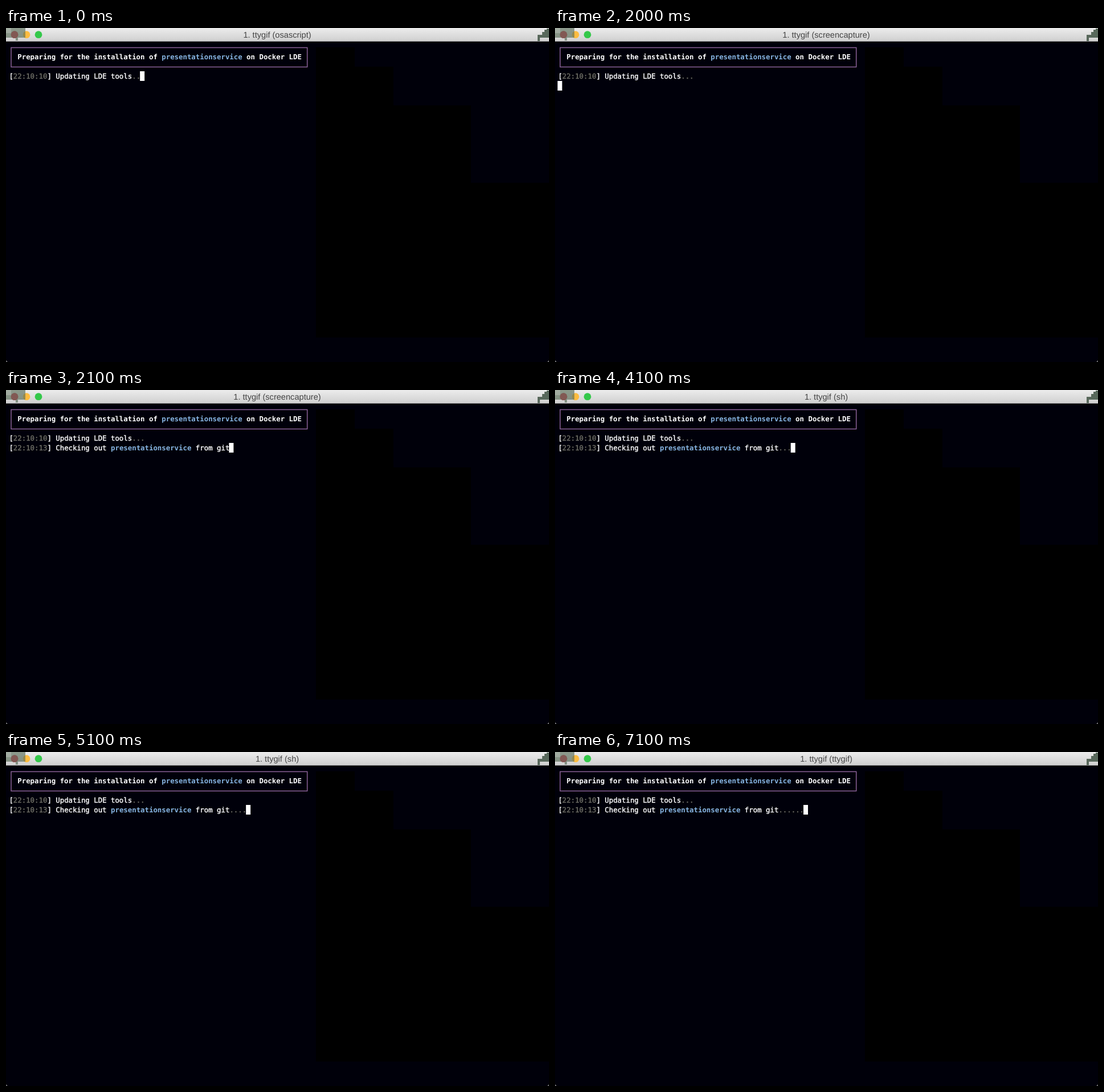
These frames come from a looping animation (953x587 px, 8 s). An HTML page with a canvas:

```html
<!DOCTYPE html>
<html lang="en">
<head>
<meta charset="utf-8">
<title>Terminal</title>
<style>
html, body { margin: 0; width: 100%; height: 100%; overflow: hidden; background: #00000a; }
canvas { position: absolute; left: 0; top: 0; }
#title {
  position: absolute; left: 0; top: 1px; width: 952px; height: 24px;
  font: 14.6px/24px "Liberation Sans", Arial, sans-serif;
  text-align: center; color: #444; text-rendering: geometricPrecision;
}
.row {
  position: absolute; left: 5.4px; height: 17px; white-space: pre; color: #fff;
  font: 12.36px/17px "DejaVu Sans Mono", Menlo, monospace;
  text-rendering: geometricPrecision; -webkit-text-stroke: .4px;
}
.row b { -webkit-text-stroke: 0; }
.name { color: #87b5e2; }
.dim { color: #6c6c63; }
#cursor { position: absolute; left: 0; top: 0; width: 7.6px; height: 17px; background: #fff; }
</style>
</head>
<body>
<canvas id="stage" width="953" height="587"></canvas>
<div id="title"></div>
<div class="row" style="top:43px"><b>  Preparing for the installation of <span class="name">presentationservice</span> on Docker LDE</b></div>
<div class="row" id="update" style="top:77px">[<span class="dim">22:10:10</span>] Updating LDE tools<span class="dim dots"></span></div>
<div class="row" id="checkout" style="top:94px">[<span class="dim">22:10:13</span>] Checking out <b class="name">presentationservice</b> from git<span class="dim dots"></span></div>
<div id="cursor"></div>
<script>
const LOOP = 8000, CELL = 7.44, LEFT = 4.5;
const $ = id => document.getElementById(id);
const ctx = $('stage').getContext('2d');

// start time, running process, dots on first line, dots on second line (null: not printed)
const steps = [
  [0, 'osascript', 2, null],
  [1000, 'sh', 3, null],
  [2000, 'screencapture', 3, null],
  [2100, 'screencapture', 3, 0],
  [3100, 'sh', 3, 2],
  [4100, 'sh', 3, 3],
  [5100, 'sh', 3, 4],
  [6100, 'ttygif', 3, 5],
  [7100, 'ttygif', 3, 6]
];

function poly(color, points) {
  ctx.fillStyle = color;
  ctx.beginPath();
  points.forEach(([x, y]) => ctx.lineTo(x, y));
  ctx.fill();
}

function rect(color, x, y, w, h) {
  ctx.fillStyle = color;
  ctx.fillRect(x, y, w, h);
}

function dot(color, x) {
  ctx.fillStyle = color;
  ctx.beginPath();
  ctx.arc(x, 11.7, 6.4, 0, Math.PI * 2);
  ctx.fill();
}

function drawWindow() {
  rect('#00000a', 0, 0, 953, 587);
  poly('#000', [[544, 34], [612, 34], [612, 68], [680, 68], [680, 136], [816, 136],
    [816, 272], [953, 272], [953, 544], [544, 544]]);

  const bar = ctx.createLinearGradient(0, 0, 0, 23);
  bar.addColorStop(0, '#ececec');
  bar.addColorStop(1, '#d0d0d0');
  rect(bar, 0, 0, 953, 23);
  rect('#888', 0, 23, 953, 1);

  dot('#8a5a58', 15);
  dot('#fdbc40', 36);
  dot('#34c84a', 57);
  rect('rgba(92,112,90,.66)', 0, 0, 34, 17);
  rect('rgba(92,112,90,.66)', 17, 17, 4, 5);
  rect('rgba(255,255,255,.2)', 0, 0, 9, 9);
  dot('rgba(137,83,81,.75)', 15);
  poly('#58685b', [[933, 23], [933, 12], [941, 12], [941, 7], [945, 7], [945, 3],
    [949, 3], [949, 1], [953, 1], [953, 17], [937, 17], [937, 23]]);

  ctx.strokeStyle = '#8b6296';
  ctx.lineWidth = 1.5;
  ctx.strokeRect(9, 34.5, 519.7, 34);

  poly('#777', [[0, 584], [3, 587], [0, 587]]);
  poly('#777', [[953, 584], [950, 587], [953, 587]]);
}

function setDots(row, count) {
  row.querySelector('.dots').textContent = '.'.repeat(count);
}

function show([start, process, first, second]) {
  const update = $('update'), checkout = $('checkout');
  $('title').textContent = `1. ttygif (${process})`;
  setDots(update, first);
  setDots(checkout, second || 0);
  checkout.hidden = second === null;

  const onFirst = start < 2000;
  const col = onFirst ? update.textContent.length
    : second === null ? 0 : checkout.textContent.length;
  $('cursor').style.transform = `translate(${LEFT + col * CELL}px, ${onFirst ? 76 : 93}px)`;
}

let current, origin;
function tick(now) {
  origin ??= now;
  const t = (now - origin) % LOOP;
  const step = steps.findLast(s => s[0] <= t);
  if (step !== current) show(current = step);
  requestAnimationFrame(tick);
}

drawWindow();
show(current = steps[0]);
requestAnimationFrame(tick);
</script>
</body>
</html>
```
